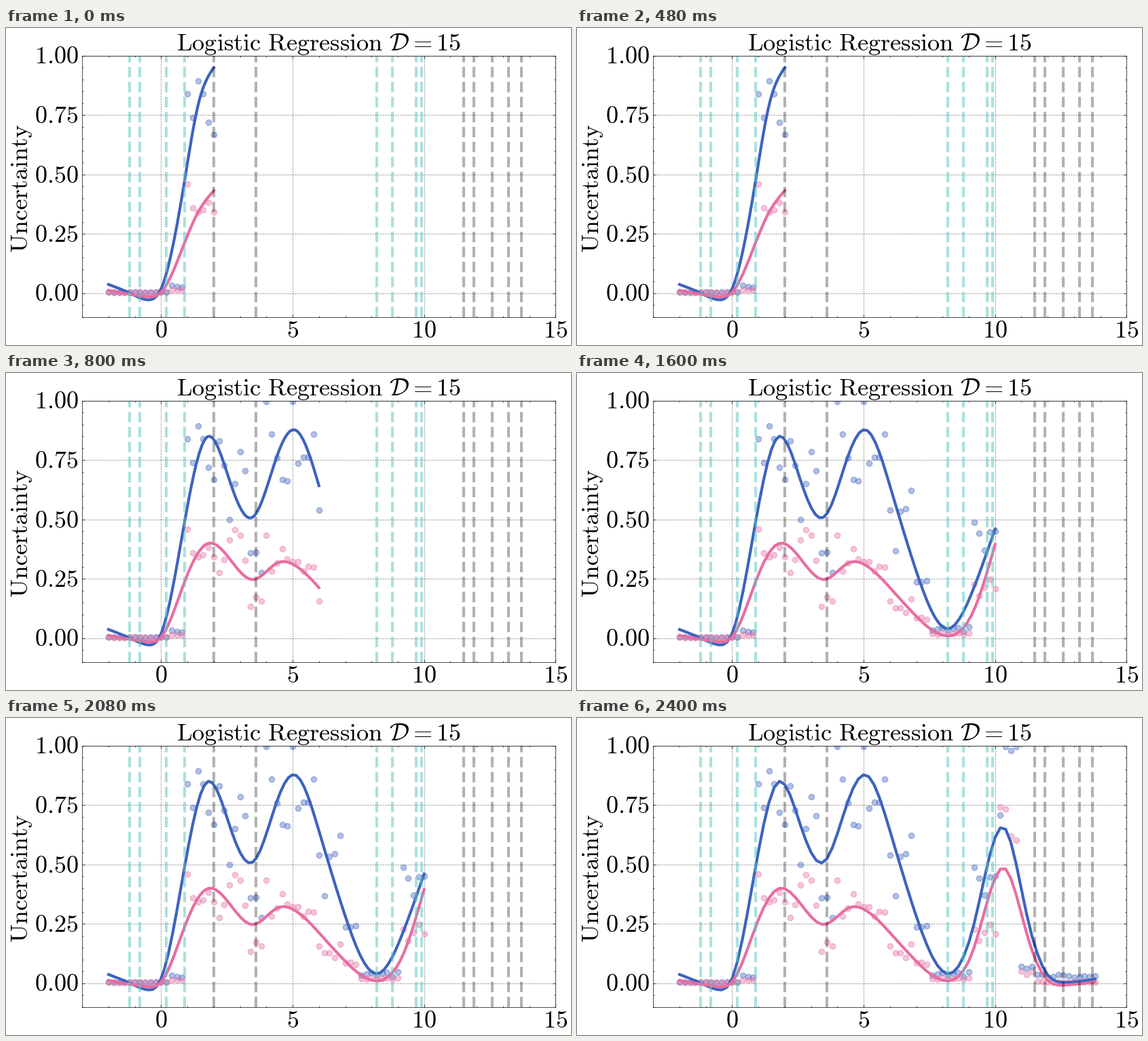
A matplotlib script for the animation above (3.2 s loop, 832 by 467 pixels).

```python
import numpy as np
import matplotlib as mpl
import matplotlib.pyplot as plt
from matplotlib.animation import FuncAnimation
from matplotlib.ticker import MultipleLocator

W, H, DPI = 832, 467, 100
LEFT, BOTTOM, AX_W, AX_H = 112.3, 41.2, 697, 385
BLUE, PINK, TEAL = "#3d63be", "#e76da1", "#57c4be"
mpl.rcParams["mathtext.fontset"] = "cm"

# Key points of the fits: x, blue, pink. The end is refitted as samples arrive.
HEAD = [(-2, .037, .012), (-1.2, .001, -.004), (-.55, -.027, -.014), (0, .02, .005)]
RISE = [(.9, .48, .215), (1.4, .79, .34), (2, .95, .432)]
BODY = [(.9, .495, .24), (1.75, .848, .398), (2.6, .665, .335), (3.5, .511, .247),
        (4.4, .765, .316), (5.1, .877, .306), (6, .642, .213), (7, .283, .093),
        (8.2, .04, .01)]
TURN = [(9.2, .215, .12), (10, .46, .395)]
TAIL = [(9.2, .25, .15), (10.35, .655, .485), (11.2, .29, .21), (12, .035, .012),
        (12.6, .004, -.008), (13.8, .018, .006)]

STAGES = [(2, HEAD + RISE), (6, HEAD + BODY), (10, HEAD + BODY + TURN),
          (13.8, HEAD + BODY + TAIL)]

# Sample levels: start x, blue, pink; each holds until the next start
LEVELS = np.array([
    (-2, .005, .004), (.4, .03, .012), (1, .97, .42), (2, .68, .36),
    (3.4, .3, .14), (4, .88, .34), (6, .5, .13), (7, .2, .08),
    (7.6, .04, .02), (9.2, .42, .2), (10.2, .97, .68), (11, .06, .05),
    (11.6, .03, .006)])


def make_samples():
    rng = np.random.default_rng(15)
    x = np.round(np.arange(-2, 13.9, 0.2), 1)
    row = np.searchsorted(LEVELS[:, 0], x, side="right") - 1
    noise = rng.uniform(0.72, 1.28, (len(x), 2))
    return x, np.clip(LEVELS[row, 1:] * noise, 0, 0.998)


def spline(knots, x):
    """Natural cubic spline through rows of (x, blue, pink)."""
    knots = np.array(knots, float)
    kx, ky = knots[:, 0], knots[:, 1:]
    h, n = np.diff(kx), len(kx)
    slope = np.diff(ky, axis=0) / h[:, None]
    a, b = np.eye(n), np.zeros_like(ky)
    for i in range(1, n - 1):
        a[i, i - 1:i + 2] = h[i - 1], 2 * (h[i - 1] + h[i]), h[i]
        b[i] = 6 * (slope[i] - slope[i - 1])
    m = np.linalg.solve(a, b)
    i = np.clip(np.searchsorted(kx, x) - 1, 0, n - 2)
    u, v, hi = (c[:, None] for c in (kx[i + 1] - x, x - kx[i], h[i]))
    return ((m[i] * u**3 + m[i + 1] * v**3) / (6 * hi)
            + (ky[i] / hi - m[i] * hi / 6) * u
            + (ky[i + 1] / hi - m[i + 1] * hi / 6) * v)


fig = plt.figure(figsize=(W / DPI, H / DPI), dpi=DPI, facecolor="white")
ax = fig.add_axes([LEFT / W, BOTTOM / H, AX_W / W, AX_H / H])
ax.set(xlim=(-3, 15), ylim=(-0.1, 1))
ax.set_axisbelow(True)
ax.grid(color="black", alpha=0.5, lw=0.5, ls="--")
for axis, major, minor in ((ax.xaxis, 5, 1), (ax.yaxis, 0.25, 0.05)):
    axis.set_major_locator(MultipleLocator(major))
    axis.set_minor_locator(MultipleLocator(minor))
for which, size in (("major", 3), ("minor", 1.5)):
    ax.tick_params(which=which, direction="in", length=size, width=0.5,
                   top=True, right=True, labelbottom=False, labelleft=False)
for spine in ax.spines.values():
    spine.set_linewidth(0.5)


def label(x, y, text, size=26, **kw):
    fig.text(x / W, 1 - y / H, f"${text}$", fontsize=size, va="baseline", **kw)


label(461, 32.5, r"\mathrm{Logistic\ Regression\ }\mathcal{D}=15", 26.2, ha="center")
label(32, 236, r"\mathrm{Uncertainty}", ha="center", rotation=90,
      rotation_mode="anchor")
for v in (0, 5, 10, 15):
    label(LEFT + (v + 3) * AX_W / 18, 455.5, str(v), ha="center")
for v in (0, 0.25, 0.5, 0.75, 1):
    label(106.7, 402.5 - 350 * v, f"{v:.2f}", ha="right")

dot_x, dot_y = make_samples()
dots = [ax.scatter([], [], s=36, lw=1, color=c, alpha=0.4) for c in (BLUE, PINK)]
lines = [ax.plot([], [], color=c, lw=3)[0] for c in (BLUE, PINK)]
for x in (-1.2, -0.8, 0.2, 0.9, 8.2, 8.8, 9.7, 9.9):
    ax.axvline(x, color=TEAL, alpha=0.5, lw=3, ls="--")
for x in (2, 3.6, 11.5, 11.9, 12.6, 13.2, 13.7):
    ax.axvline(x, color="black", alpha=0.3, lw=3, ls="--")


def draw(i):
    end, knots = STAGES[i]
    shown = dot_x <= end
    x = np.linspace(-2, end, 80)
    fit = spline(knots, x)
    for k in range(2):
        dots[k].set_offsets(np.c_[dot_x, dot_y[:, k]][shown])
        lines[k].set_data(x, fit[:, k])
    return dots + lines


anim = FuncAnimation(fig, draw, frames=len(STAGES), interval=800, repeat=True,
                     repeat_delay=0)
plt.show()
```
